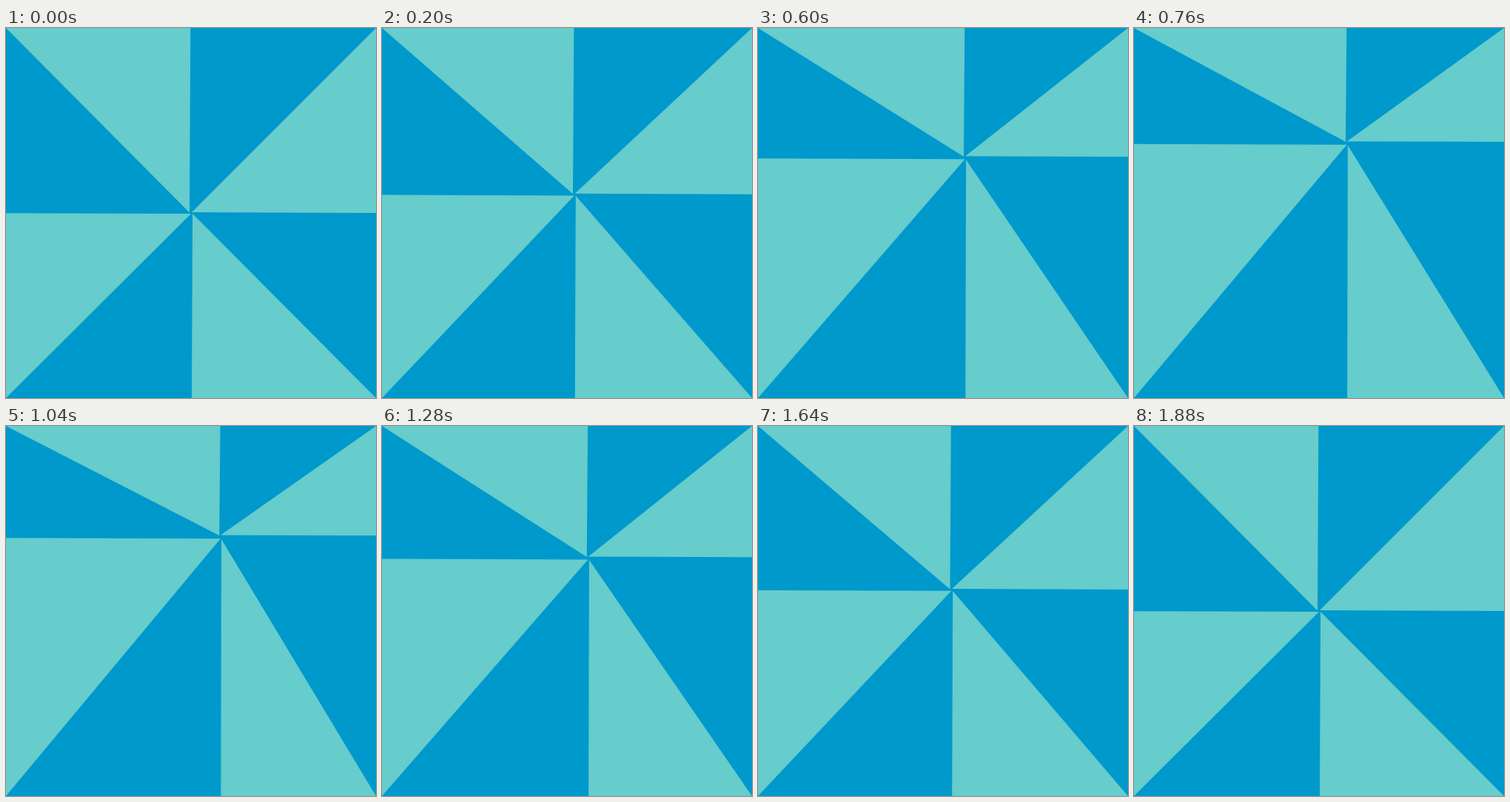
These frames come from a looping animation (500 by 500 pixels, 1920 ms). An HTML page:

```html
<!DOCTYPE html>
<html lang="en">
<head>
<meta charset="utf-8">
<title>Pinwheel</title>
<style>
  html, body { margin: 0; width: 100%; height: 100%; overflow: hidden; background: #09c; }
  svg { display: block; width: 500px; height: 500px; }
  polygon { fill: #6cc; }
</style>
</head>
<body>
<svg viewBox="0 0 500 500">
  <polygon id="top"/>
  <polygon id="right"/>
  <polygon id="bottom"/>
  <polygon id="left"/>
</svg>
<script>
  const STEP = 40, STEPS = 48, PEAK = 23;
  const blades = ["top", "right", "bottom", "left"].map(id => document.getElementById(id));

  // 0 at rest, 1 when the hub is farthest up and to the right
  function reach(step) {
    return step <= PEAK ? step / PEAK : (STEPS - 1 - step) / (STEPS - 1 - PEAK);
  }

  // Each blade: fixed corner, sliding edge point, tip near the hub
  function shapes(k) {
    return [
      [0, 0, 249.3 + 46 * k, 0, 248 + 46 * k, 249.5 - 116 * k],
      [500, 0, 500, 250 - 116.5 * k, 251 + 44.5 * k, 249 - 116 * k],
      [500, 500, 251 + 45 * k, 500, 252.1 + 44.5 * k, 251 - 112 * k],
      [0, 500, 0, 250.2 - 113.2 * k, 250 + 45.5 * k, 251 - 113 * k]
    ];
  }

  function draw(step) {
    shapes(reach(step)).forEach((points, i) => blades[i].setAttribute("points", points.join(" ")));
  }

  const start = performance.now();
  function tick() {
    const time = Math.max(0, performance.now() - start);
    draw(Math.floor(time / STEP) % STEPS);
    requestAnimationFrame(tick);
  }
  draw(0);
  requestAnimationFrame(tick);
</script>
</body>
</html>
```
